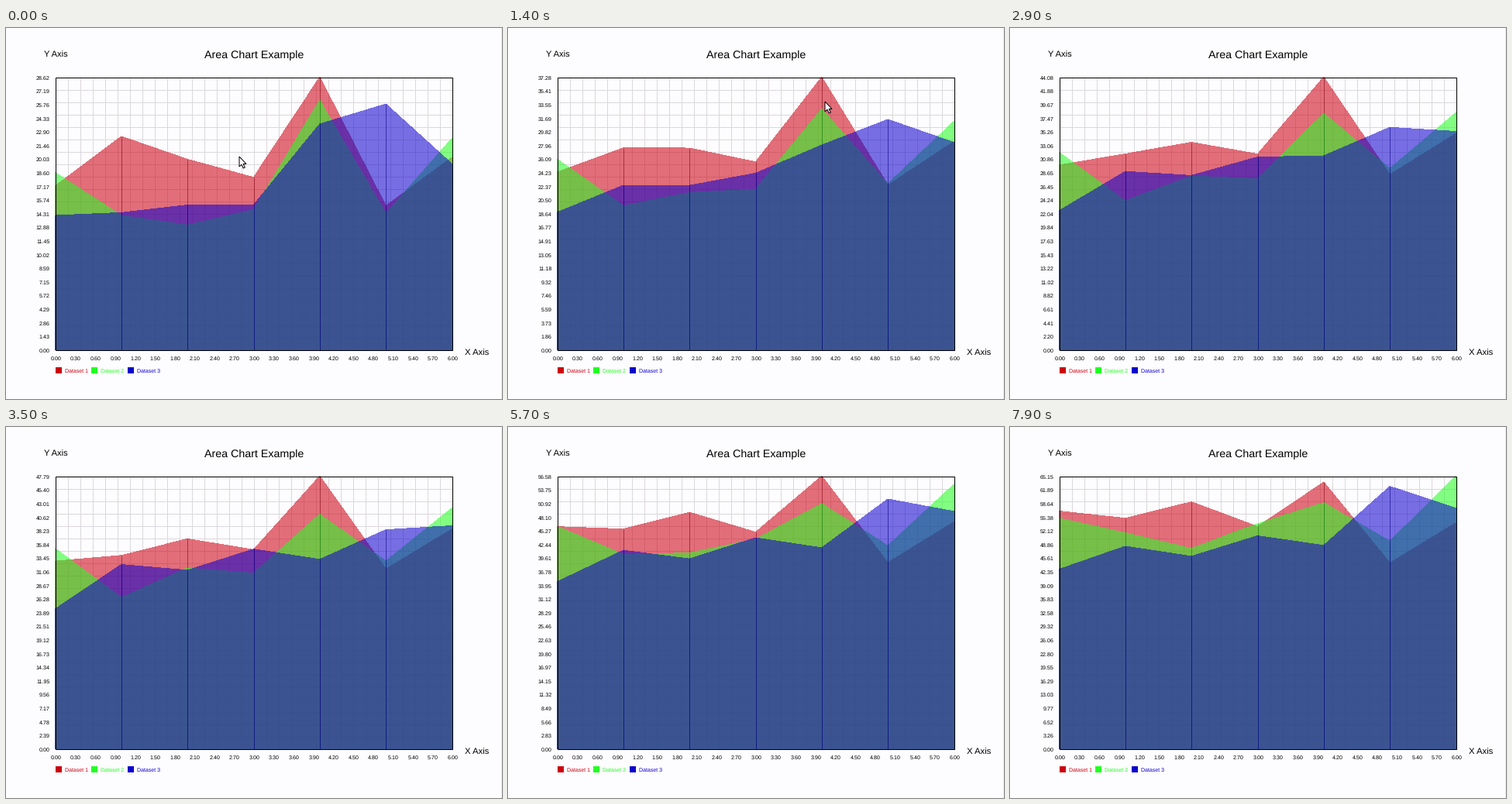
Recreate the animation shown at these times as a matplotlib script. Size 640 px wide and 479 px high, loop 8000 ms.

```python
import numpy as np
import matplotlib.pyplot as plt
from matplotlib.animation import FuncAnimation
from matplotlib.patches import Polygon, Rectangle

W, H, DPI = 640, 479, 100
LEFT, RIGHT, TOP, BOTTOM = 64, 576, 64, 416
CELL, TICKS = 16, 20
FRAMES, INTERVAL = 80, 100
PX = 72 / DPI  # one pixel in points

plt.rcParams["font.family"] = "Liberation Sans"
plt.rcParams["text.hinting"] = "none"

FILLS = ["#cc0011", "#22ff22", "#0d00cc"]
SEAMS = ["#7c000c", "#148414", "#080088"]
ALPHA = 0.56

# The data pauses for one tick at these frames.
HOLDS = np.array([20, 23, 25, 28, 47, 59, 64, 67, 72, 75])


def step(frame):
    return frame - np.count_nonzero(HOLDS <= frame)


# Each dataset grows steadily from its first row through its second to its last.
KNOTS = [step(0), step(35), step(FRAMES - 1)]
DATA = np.array([
    [[17.2, 22.4, 20.0, 18.1, 28.62, 15.1, 20.2],
     [32.9, 33.9, 36.8, 34.9, 47.79, 31.5, 38.5],
     [56.8, 55.1, 59.0, 53.1, 63.7, 44.4, 54.0]],
    [[18.6, 14.1, 13.1, 14.7, 26.2, 14.3, 22.2],
     [35.1, 26.5, 31.7, 30.8, 41.1, 32.9, 42.2],
     [55.1, 51.6, 47.9, 53.8, 58.8, 49.6, 65.15]],
    [[14.1, 14.4, 15.2, 15.2, 23.7, 25.8, 19.5],
     [24.5, 32.3, 31.3, 35.0, 33.2, 38.4, 39.1],
     [42.9, 48.4, 46.0, 50.9, 48.6, 62.7, 57.5]],
])
XS = np.linspace(LEFT, RIGHT, DATA.shape[2])

CURSOR_SHAPE = np.array([(0, 0), (0, 13), (3, 10.3), (5.2, 15),
                         (7.3, 14), (5.1, 9.5), (9, 9.5)])
CURSOR_TIMES = [0, 4, 9, 14, 18]
CURSOR_X = [301, 290, 380, 409, 425]
CURSOR_Y = [166, 420, 32, 95, 2]

fig = plt.figure(figsize=(W / DPI, H / DPI), dpi=DPI, facecolor="#fdfcfe")
ax = fig.add_axes([0, 0, 1, 1])
ax.set_xlim(0, W)
ax.set_ylim(H, 0)
ax.axis("off")


def label(x, y, text, size, color="black", ha="left"):
    return ax.text(x, y, text, fontsize=size * PX, color=color,
                   ha=ha, va="baseline", zorder=6)


def line(xs, ys, color, zorder, **kw):
    """One-pixel line; whole coordinates snap to pixel centres."""
    return ax.plot(xs, ys, color=color, lw=PX, zorder=zorder,
                   solid_capstyle="butt", **kw)[0]


def box(x, y, w, h, zorder, **kw):
    ax.add_patch(Rectangle((x, y), w, h, zorder=zorder, **kw))


# Grid and frame
for x in range(LEFT + CELL, RIGHT, CELL):
    line([x, x], [TOP, BOTTOM], "#dad8dc", 1)
for y in range(TOP + CELL, BOTTOM, CELL):
    line([LEFT, RIGHT], [y, y], "#dad8dc", 1)
box(LEFT, TOP, RIGHT - LEFT, BOTTOM - TOP, 5, fc="none", ec="black", lw=PX)
line([W - 1, W - 1], [0, H], "#e6e5e7", 1)

# Titles, ticks and legend
label(320.5, 39, "Area Chart Example", 14.2, ha="center")
label(49, 38, "Y Axis", 11.1)
label(592, 422.5, "X Axis", 11.3)
for i in range(TICKS + 1):
    x = LEFT + 0.5 + i * (RIGHT - LEFT) / TICKS
    label(x, 428.8, f"{i * 0.3:.2f}", 7.2, ha="center")
ticks = [label(56.8, BOTTOM + 2.8 - i * (BOTTOM - TOP) / TICKS, "", 7.2,
               ha="right") for i in range(TICKS + 1)]
for i, color in enumerate(FILLS):
    x = LEFT + round(46.5 * i)
    box(x, 438, 8, 8, 6, fc=color, ec="none")
    label(x + 12, 444.8, f"Dataset {i + 1}", 7, color)

# Areas, each with darker seams where its segments meet
areas, seams = [], []
for i, (fill, dark) in enumerate(zip(FILLS, SEAMS)):
    area = Polygon(np.zeros((3, 2)), fc=fill, ec="none", alpha=ALPHA,
                   zorder=2 + i * 0.2, antialiased=False)
    areas.append(ax.add_patch(area))
    seams.append([line([x, x], [BOTTOM, BOTTOM], dark, 2.1 + i * 0.2,
                       alpha=ALPHA) for x in np.floor(XS[1:-1])])

cursor = ax.add_patch(Polygon(CURSOR_SHAPE, fc="white", ec="black",
                              lw=PX, zorder=8))


def values_at(s):
    return np.array([[np.interp(s, KNOTS, knots) for knots in rows.T]
                     for rows in DATA])


def update(frame):
    data = values_at(step(frame))
    peak = data.max()
    heights = BOTTOM - 0.5 - data / peak * (BOTTOM - TOP)
    for area, lines, ys in zip(areas, seams, heights):
        area.set_xy([(LEFT, BOTTOM), *zip(XS - 0.5, ys),
                     (RIGHT, ys[-1]), (RIGHT, BOTTOM)])
        for seam, y in zip(lines, ys[1:-1]):
            seam.set_ydata([y, BOTTOM])
    for i, tick in enumerate(ticks):
        tick.set_text(f"{peak * i / TICKS:.2f}")

    cursor.set_visible(frame < CURSOR_TIMES[-1])
    tip = [np.interp(frame, CURSOR_TIMES, path) for path in (CURSOR_X, CURSOR_Y)]
    cursor.set_xy(CURSOR_SHAPE + tip)
    return [*areas, *ticks, cursor]


anim = FuncAnimation(fig, update, frames=FRAMES, interval=INTERVAL,
                     repeat=True, repeat_delay=0, blit=False)
plt.show()
```
